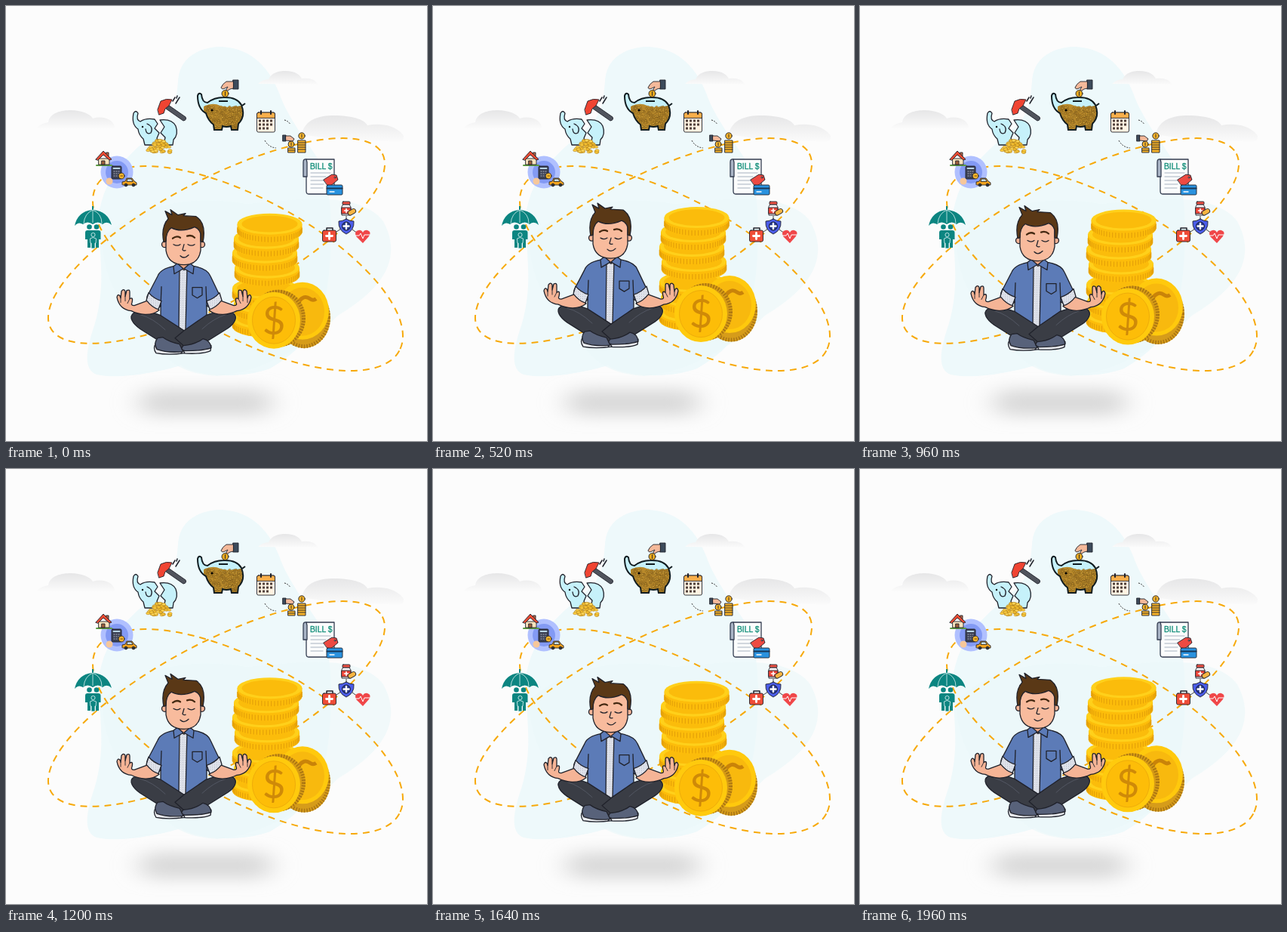
Recreate the animation shown at these times as an HTML page. Size 558x576 px, loop 2 s.

```html
<!DOCTYPE html>
<html lang="en">
<head>
<meta charset="utf-8">
<title>Calm saver</title>
<style>
html, body { margin: 0; width: 100%; height: 100%; overflow: hidden; background: #fcfcfc; }
svg { display: block; width: 558px; height: 576px; }
text { font-family: "Liberation Sans", Arial, sans-serif; }
.ink { stroke: #20222b; stroke-width: 1.3; stroke-linejoin: round; stroke-linecap: round; }
.line { fill: none; }
.orbit { fill: none; stroke: #f7a90a; stroke-width: 2; stroke-dasharray: 9 7; }
.thin { stroke-width: .9; }
.bank { stroke: #111c20; stroke-width: 2; }
</style>
</head>
<body>
<svg viewBox="0 0 558 576">
<defs>
  <linearGradient id="cloud" x2="0" y2="1"><stop stop-color="#e6e6e7"/><stop offset="1" stop-color="#fbfbfb"/></linearGradient>
  <filter id="blur" x="-30%" y="-100%" width="160%" height="300%"><feGaussianBlur stdDeviation="17 10"/></filter>
  <path id="body" d="M254 119Q255 114 259 117Q260 128 267 128Q276 121 288 121Q306 120 312 131Q318 146 308 156L307 164H299L298 159Q292 161 287 159L286 164H276L275 157Q268 152 265 142Q254 136 254 119Z"/>
  <clipPath id="savings"><use href="#body"/></clipPath>
  <pattern id="weave" width="3" height="3" patternUnits="userSpaceOnUse"><path d="M0 0h3v3h-3z" fill="#dfe2ea"/><path d="M0 0h1v1h-1z" fill="#b6bbc9"/></pattern>
</defs>

<path fill="#eef9fb" d="M228 100C230 65 260 54 286 54C328 56 350 85 362 115C374 150 400 180 415 205C432 240 432 290 430 330C426 390 420 440 350 480C310 495 250 490 232 476C200 485 150 495 120 488C100 480 108 450 118 420C135 360 120 320 124 270C134 220 165 195 200 165C225 145 225 130 228 100Z"/>
<path fill="#ebf8fa" opacity=".6" d="M128 305C180 260 250 250 320 262C390 255 470 245 500 285C530 340 490 380 440 410C400 450 340 485 280 490C240 488 215 475 190 440C160 410 125 360 128 305Z"/>

<g fill="url(#cloud)">
  <path d="M41 162Q46 155 56 154C58 141 74 138 86 138C100 138 112 143 115 149C128 145 142 150 144 160L143 162Z"/>
  <path d="M334 103Q340 97 348 97C352 88 362 86 370 86C384 86 390 92 392 96Q408 94 414 104Z"/>
  <path d="M392 170C396 150 415 145 435 145C458 145 475 150 479 158C500 154 520 160 527 172Q528 179 520 180L430 176Z"/>
</g>
<rect x="177" y="507" width="175" height="36" rx="18" fill="#dadada" filter="url(#blur)"/>

<ellipse class="orbit" rx="248.3" ry="81" transform="translate(279 311) rotate(-27.7)"/>
<ellipse class="orbit" rx="228.5" ry="91.6" transform="translate(320.5 347.5) rotate(28.5)"/>

<!-- family under an umbrella -->
<g fill="#0c8581">
  <path d="M91 291Q95 272 114 270V265H116V270Q135 272 140 290Q134 284 128 289Q122 284 115 289Q108 284 102 289Q96 285 91 291Z"/>
  <path d="M103 288Q104 275 115 270M127 288Q127 275 115 270M115 270V287" class="line" stroke="#d8f0f0" stroke-width=".8"/>
  <circle cx="110.500" cy="292.500" r="3.300"/><circle cx="120" cy="292.500" r="3.300"/>
  <path d="M105 300Q105 297 108 297H122Q125.500 297 125.500 300V309H123V320H119V311H112V320H108V309H105Z"/>
  <g stroke="#e9f8fa" stroke-width=".8"><circle cx="115.500" cy="303" r="2.600"/><path d="M111.500 308Q115 305 119.500 308L119 314H118V321H113V314H112Z"/></g>
</g>

<!-- house, calculator and car -->
<circle cx="147" cy="220" r="21.500" fill="#b0c0ff"/>
<circle cx="147" cy="220" r="15" fill="#839af4"/>
<g class="ink thin">
  <path d="M120 211H140" stroke="#5d9b43" stroke-width="2"/>
  <path d="M123 202H137V210H123Z" fill="#f8e3bd"/>
  <path d="M133 194H136V200H133Z" fill="#b96a48"/>
  <path d="M119 203L129 192L140 203L137 204L129 197L122 204Z" fill="#e84a32"/>
  <path d="M127 205H131V210H127Z" fill="#a0603c"/>
  <rect x="140" y="212" width="13" height="17" rx="1.500" fill="#3b4054"/>
  <path d="M142.500 215H150.500" stroke="#b9d5e5" stroke-width="2"/>
  <path d="M143 219H150M143 222H150M143 225H150" stroke="#c4c7d3" stroke-dasharray="1 2"/>
  <circle cx="153" cy="225" r="4" fill="#f9b52c"/>
  <path d="M154 236V233L158 232L160 228H167L170 232L173 234V237H155Z" fill="#f4a51f"/>
  <path d="M160 232L161 229H166L168 232Z" fill="#d6edf2"/>
  <circle cx="159" cy="237" r="1.900" fill="#333"/><circle cx="169" cy="237" r="1.900" fill="#333"/>
</g>
<circle cx="137" cy="232" r="4.500" fill="#f6c79a"/>
<path d="M151.500 225H155" stroke="#6c4a12"/>

<!-- broken bank and hammer -->
<g class="ink" fill="#c6f1fa" stroke="#10262f">
  <path d="M169 142Q172 137 175 142Q172 151 178 153Q185 148 197 150L201 156L197 162L203 168L200 175L203 184H184L182 176Q176 171 175 163Q166 157 169 142Z"/>
  <path d="M204 151Q220 149 225 159Q229 170 222 177L221 184H209L211 174L205 168L210 160Z"/>
  <path class="line" d="M187 156Q196 160 192 168Q186 171 185 163"/>
</g>
<circle cx="181" cy="160" r="1.200"/>
<g id="pile"></g>
<g class="ink thin">
  <path d="M215 131L238 147Q240 151 235 152L212 136Z" fill="#50545d"/>
  <path d="M201 137L205 126Q212 122 220 124L216 132L211 136L209 142L203 144Z" fill="#f04432"/>
  <path class="line" d="M221 126L224 121M225 129L230 121M226 122L227 119" stroke-width="1.500"/>
</g>

<!-- full bank and hand -->
<use href="#body" fill="#c6f1fa"/>
<g clip-path="url(#savings)"><path fill="#b98a2b" d="M262 133Q274 127 284 132Q298 137 318 130V166H262Z"/><g id="hoard"></g></g>
<use href="#body" class="bank line"/>
<path class="bank line" d="M282 126H294M313 132L317 129"/>
<circle cx="273" cy="138" r="1.600"/>
<g class="ink thin">
  <rect x="301" y="98" width="7" height="12" fill="#3d4b5b"/>
  <path d="M301 100L292 100Q287 103 285 108Q286 111 290 109L294 107L291 112Q294 113 297 110L301 109Z" fill="#f4b99a"/>
  <circle cx="290.500" cy="116" r="4.500" fill="#e9a81e"/>
  <path class="line" d="M290.500 113.500V118.500"/>
</g>

<!-- calendar -->
<g class="ink thin">
  <rect x="332.500" y="141" width="24" height="26" rx="2" fill="#fff3e2"/>
  <path d="M332.500 148V143Q333 141 335 141H354Q356.500 141 356.500 143V148Z" fill="#f8ae4a"/>
  <path d="M338 139V143M351 139V143" stroke-width="2"/>
  <path d="M335 152H354M335 157H354M335 162H350" stroke="#51413b" stroke-width="3" stroke-dasharray="3 2" stroke-linecap="butt"/>
</g>
<path class="line" d="M369 151Q374 152 377 157M343 178Q348 187 358 188" stroke="#333" stroke-dasharray="2 1.500"/>

<!-- saving hand -->
<g class="ink thin">
  <rect x="367" y="171" width="4" height="8" fill="#3d4b5b"/>
  <path d="M371 172H377L382 176L380 179L371 178Z" fill="#f4b99a"/>
  <circle cx="378" cy="183" r="4" fill="#f8b42a"/><circle cx="392" cy="172" r="4.200" fill="#f8b42a"/>
  <path d="M374 188H383V194H374ZM387 178H397V194H387Z" fill="#f8b42a"/>
  <path d="M374 191H383M387 181H397M387 184H397M387 187H397M387 190H397M378 181V185M392 170V174"/>
</g>

<!-- bill -->
<g class="ink">
  <path d="M398 203H435V249H401Q398 249 398 245Z" fill="#fbfcfc" stroke="#343d50"/>
  <path d="M398 203Q394 202 394 207V226H399V207Z" fill="#a9b4c5" stroke="#343d50"/>
  <path d="M404 221H430M404 226H424M404 231H422M404 236H421M404 241H420" stroke="#c3cad3"/>
  <path d="M421 230L432 223L438 224L440 230L428 240Z" fill="#ed4a42" class="thin"/>
  <circle cx="436" cy="227" r="1" fill="#fff" class="thin"/>
  <rect x="425" y="237" width="21" height="13" rx="1.500" fill="#2a92df" class="thin"/>
  <path d="M425.500 241.500H445.500" stroke="#183858" stroke-width="2"/>
  <path d="M429 246H435" stroke="#fff"/>
</g>
<text x="403" y="215.500" font-size="10.300" fill="#16917c" stroke="#16917c" stroke-width=".35">BILL $</text>

<!-- health -->
<path class="line" d="M438 299L444 295M459 296L466 301M451 283V278" stroke="#444"/>
<g class="ink thin">
  <rect x="446" y="259" width="10" height="4" rx="1" fill="#f05144"/>
  <path d="M447 263H455L457 266V277H445V266Z" fill="#f5edf0"/>
  <path d="M445 267H457V275H445Z" fill="#ed4639"/>
  <path d="M451 268.500V273.500M448.500 271H453.500" stroke="#fff" stroke-width="1.600"/>
  <rect x="453" y="270" width="11" height="6" rx="3" transform="rotate(-30 458 273)" fill="#f7b542"/>
  <path d="M451 282Q456 285 461 285Q462 297 451 302Q440 297 441 285Q446 285 451 282Z" fill="#4a5ce8"/>
  <circle cx="451" cy="291.500" r="5.500" fill="#25368f"/>
  <path d="M451 288V295M447.500 291.500H454.500" stroke="#fff" stroke-width="2.400"/>
  <path class="line" d="M425 298V294H433V298" stroke-width="1.500"/>
  <rect x="419.500" y="297" width="18" height="15" rx="2" fill="#ef4d38"/>
  <path d="M428.500 300.500V308.500M424.500 304.500H432.500" stroke="#fff" stroke-width="2.800"/>
</g>
<path d="M473 314L464 305Q461 298 467 297Q471 296 473 300Q475 296 479 297Q485 299 481 305Z" fill="#f04749"/>
<path class="line" d="M463 304H468L470 301L473 308L475 303H482" stroke="#fff"/>

<g id="float">
  <g id="stack"></g>

  <!-- leaning coins -->
  <ellipse cx="395" cy="413" rx="35" ry="40.500" fill="#d69c1a"/>
  <ellipse cx="395" cy="413" rx="32.500" ry="38" fill="none" stroke="#aa7514" stroke-width="5" stroke-dasharray="1.600 2"/>
  <ellipse cx="393" cy="404" rx="35" ry="38" fill="#ffc90d"/>
  <ellipse cx="393" cy="405" rx="29" ry="32" fill="#f8b90e"/>
  <path class="line" d="M388 392Q395 382 403 388Q407 391 411 388" stroke="#c98309" stroke-width="5"/>
  <ellipse cx="361" cy="414" rx="36" ry="38" fill="#d69b15"/>
  <ellipse cx="361" cy="414" rx="33.500" ry="35.500" fill="none" stroke="#a87311" stroke-width="5" stroke-dasharray="1.600 2"/>
  <ellipse cx="355" cy="416.500" rx="35" ry="37.500" fill="#ffca0d"/>
  <ellipse cx="355" cy="416.500" rx="28.500" ry="31" fill="#fdbd08" stroke="#efac0a"/>
  <text x="355" y="435" font-size="53" text-anchor="middle" fill="#cf8a08" style="font-family: Lato, sans-serif">$</text>

  <!-- meditating man -->
  <g class="ink">
    <path fill="#5c7bb7" d="M222 345C212 347 204 350 201 358L189 381Q185 387 188 391L203 399L205 397V416L236 437L266 416V397L269 399L284 391Q286 387 282 381L271 358C268 350 260 347 250 345Z"/>
    <path fill="url(#weave)" d="M230 346H240L238 430H229Z"/>
    <path class="line" d="M206 372L205 398M265 372L266 398M247 373H260V383L253.500 387L247 383Z"/>
    <path fill="#3a3d45" d="M205 410C190 404 176 403 169 407C162 412 168 421 178 428L205 445L240 457L248 444L236 430Z"/>
    <path fill="#3a3d45" d="M265 410C280 404 294 403 301 407C308 412 303 421 294 427L262 447L243 457L224 440L236 430Z"/>
    <path class="line thin" d="M178 409Q194 413 211 429M291 409Q275 414 260 428" stroke="#555a66"/>
    <path fill="#e9ebef" d="M199 447Q194 453 199 460Q215 463 237 460L235 456ZM235 456L232 460Q260 462 271 457L272 450Z"/>
    <path fill="#58627a" d="M201 440Q195 447 200 455Q214 460 235 458L230 448Q216 445 208 439Z"/>
    <path fill="#58627a" d="M235 450Q250 449 261 441Q271 443 272 453Q262 457 237 457Q230 455 235 450Z"/>
    <g id="arm">
      <path fill="#f5b496" d="M203 403C192 412 176 409 166 404C155 403 149 396 147 386Q148 381 151 384L152 387L153 378Q156 374 158 378V385L160 377Q164 375 164 379V388Q169 385 167 393Q165 397 170 397L189 390Z"/>
      <path class="line thin" d="M152 387V393M158 385V391M164 388L161 394"/>
      <path fill="url(#weave)" d="M189 380L186 390Q194 400 202 402L206 391Q196 388 189 380Z"/>
    </g>
    <use href="#arm" transform="translate(472) scale(-1 1)"/>
    <path fill="#eaa584" d="M228 337H243V345L236 350L228 345Z"/>
    <path fill="#5c7bb7" d="M227 341L222 345L223 355L235 348ZM244 341L249 345L248 355L236 348Z"/>
    <circle cx="210.500" cy="316" r="4" fill="#f5b496"/><circle cx="259.500" cy="316" r="4" fill="#f5b496"/>
    <path fill="#f8bb9d" d="M212 286H258V324Q255 343 236 343Q215 343 212 324Z"/>
    <path fill="#5a3816" d="M209 313Q205 293 215 282L211 272L220 277L218 270L228 277L238 275L235 278L252 279Q266 288 261 313L258 312V302Q256 295 250 293Q232 301 219 294Q212 299 212 312Z"/>
    <path class="line" d="M221 308Q226 304 231 307M240 305Q246 303 250 307" stroke="#432811" style="stroke-width:2.3"/>
    <path class="line" d="M222 316Q227 319 231 316M241 316Q246 319 250 316M236 316L234 323Q235 325 238 324M231 331Q236 336 242 330"/>
  </g>
</g>
</svg>
<script>
const $ = id => document.getElementById(id);

let seed = 7;
const rnd = () => (seed = seed * 16807 % 2147483647) / 2147483647;

// Loose coins; place() gives each coin's position
function scatter(id, count, r, tones, edge, place) {
  let out = "";
  for (let i = 0; i < count; i++) {
    const [x, y] = place();
    out += `<ellipse cx="${x}" cy="${y}" rx="${r}" ry="${r * .65}" fill="${tones[i % tones.length]}" stroke="${edge}" stroke-width=".5"/>`;
  }
  $(id).innerHTML = out;
}
scatter("hoard", 260, 1.6, ["#d9a83a", "#b98a2b", "#c9962c"], "#73531a", () => [265 + rnd() * 50, 133 + rnd() * 30]);
scatter("pile", 75, 2.6, ["#ffd858", "#f5c02f", "#fbcb3c"], "#a8781a", () => {
  const h = rnd() * 16;
  return [204 + (rnd() - .5) * (40 - 2 * h), 194 - h];
});

function coin(cx, y, rx = 43, h = 11) {
  const ry = 14;
  let ticks = "";
  for (let a = .12; a < 3.1; a += .1) {
    ticks += `M${cx - rx * Math.cos(a)} ${y + ry * Math.sin(a) + 3}v${h - 4}`;
  }
  return `<path fill="#fdbd0a" d="M${cx - rx} ${y}v${h}a${rx} ${ry} 0 0 0 ${2 * rx} 0v${-h}z"/>
    <path d="${ticks}" stroke="#e5a108" stroke-width="1.2"/>
    <ellipse cx="${cx}" cy="${y}" rx="${rx}" ry="${ry}" fill="#ffd01a"/>
    <ellipse cx="${cx}" cy="${y}" rx="${rx * .86}" ry="${ry * .78}" fill="#fbbc0b"/>`;
}
$("stack").innerHTML = [[343, 414], [345, 394], [343, 374], [346, 347], [343, 327], [345, 308], [349.5, 289]]
  .map(([x, y]) => coin(x, y)).join("");

// Quick sink, slower rise
const LOW = -12.2, HIGH = 8.6, TOP = 720, BOTTOM = 1460, LOOP = 2000;
function lift(t) {
  if (t >= TOP && t <= BOTTOM) return LOW + (HIGH - LOW) * (t - TOP) / (BOTTOM - TOP);
  const since = (t - BOTTOM + LOOP) % LOOP;
  return HIGH + (LOW - HIGH) * since / (LOOP - BOTTOM + TOP);
}

function draw() {
  const t = Math.floor(performance.now() % LOOP / 40) * 40;
  $("float").setAttribute("transform", `translate(0 ${lift(t).toFixed(2)})`);
  requestAnimationFrame(draw);
}
draw();
</script>
</body>
</html>
```
